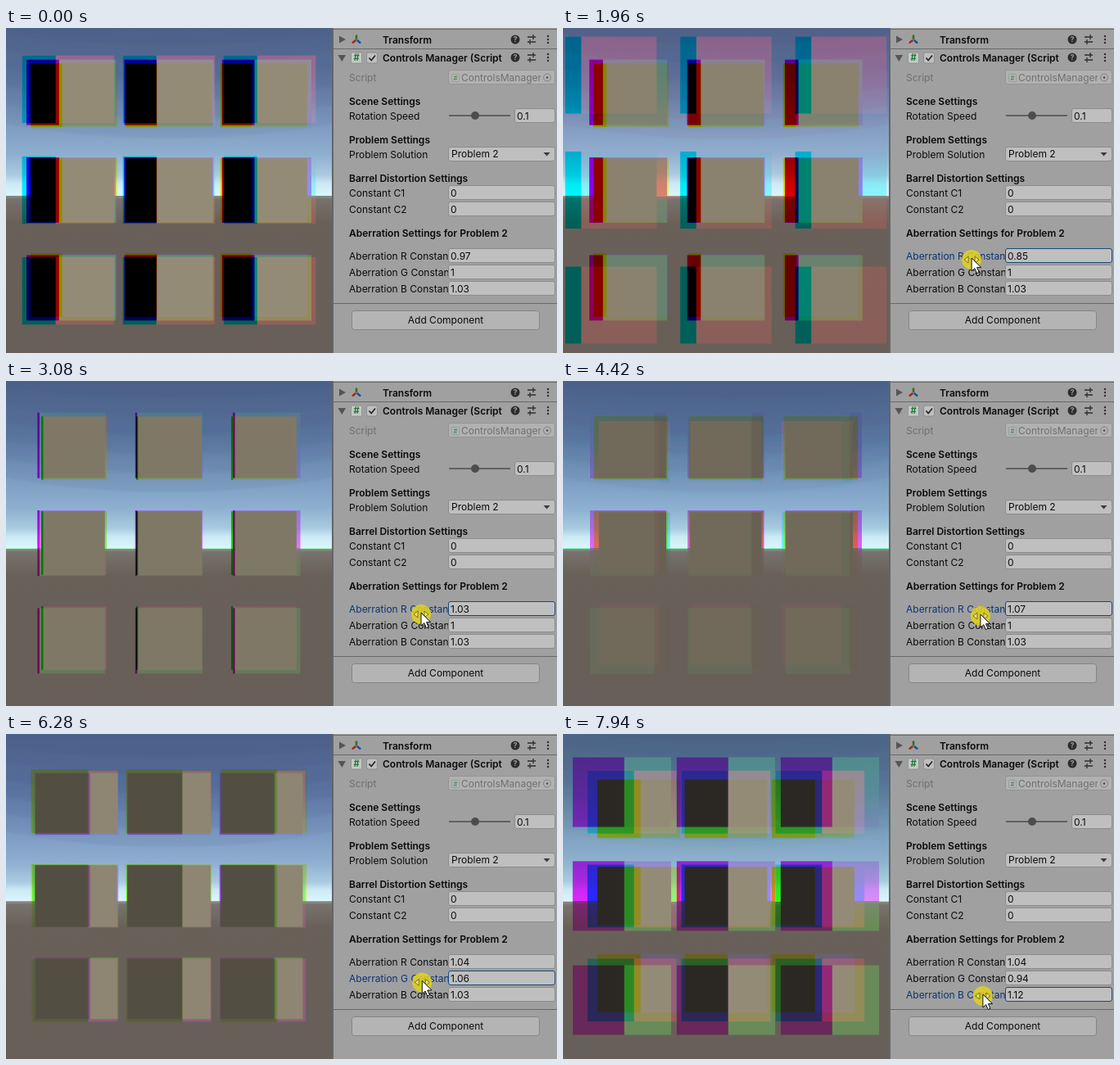
These frames come from a looping animation (673 px wide and 397 px high, 8 s). An HTML page with a canvas:

```html
<!DOCTYPE html>
<html lang="en">
<head>
<meta charset="utf-8">
<title>Chromatic aberration inspector</title>
<style>
html, body { margin: 0; width: 100%; height: 100%; overflow: hidden; background: #a0a0a0; }
canvas, #panel { position: absolute; left: 0; top: 0; }
#panel { font: 12px Inter, Roboto, sans-serif; fill: #0b0b0b; }
#panel svg { overflow: hidden; }
.bold { font-weight: 600; }
.field { fill: #bfbfbf; stroke: #8c8c8c; }
.dim { fill: #707070; }
.active .field { stroke: #1b487c; }
.active .label { fill: #0b3474; }
.line { stroke: #696969; fill: none; }
</style>
</head>
<body>
<canvas id="view" width="399" height="397"></canvas>
<svg id="panel" width="673" height="397"></svg>
<script>
const LOOP = 8000, STEP = 102.9;
const W = 399, H = 397, MID_X = 199, MID_Y = 198;
const CUBE = 80, GAP = 119.4;
const clamp = (v, lo, hi) => Math.max(lo, Math.min(hi, v));

// ---------- inspector panel ----------
const text = (x, y, s, cls = '') => `<text x="${x}" y="${Math.round(y + 4.4)}" class="${cls}">${s}</text>`;
const clipped = (x, y, w, s, cls = '') =>
  `<svg x="${x}" y="${y - 10}" width="${w}" height="20">${text(0, 10, s, cls)}</svg>`;
const box = (x, y, w, cls = 'field') =>
  `<rect x="${x + .5}" y="${y - 8.5}" width="${w - 1}" height="17" rx="2.5" class="${cls}"/>`;
const row = (y, label, value, id = '') =>
  `<g id="${id}">${clipped(419, y, 121, label, 'label')}${box(540, y - 1, 131)}
   ${text(543, y, value, 'value')}</g>`;
const headIcons = y => `
  <circle cx="622" cy="${y}" r="5.5" fill="#2d2d2d"/>
  <text x="622" y="${y + 3.4}" font-size="9" font-weight="700" text-anchor="middle" fill="#a0a0a0">?</text>
  <path d="M637 ${y - 3}h10M637 ${y + 3}h10M644 ${y - 6}v6M640 ${y}v6" stroke="#2d2d2d" stroke-width="1.3" fill="none"/>
  ${[-4, 0, 4].map(d => `<circle cx="662" cy="${y + d}" r="1.2" fill="#2d2d2d"/>`).join('')}`;
const scriptIcon = (x, y, size) => `
  <rect x="${x - size / 2}" y="${y - size / 2}" width="${size}" height="${size}" rx="1" fill="#c4c9c4" stroke="#818781" stroke-width=".7"/>
  <text x="${x}" y="${y + size * .3}" font-size="${size * .85}" font-weight="700" text-anchor="middle" fill="#1f7a35">#</text>`;

panel.innerHTML = `
  <rect x="398" width="275" height="397" fill="#a0a0a0"/>
  <rect x="398" width="2" height="397" fill="#656565"/>
  <path class="line" d="M400 1.5H673M400 25.5H673M400 336.5H673"/>
  <path d="M407 9.5l8 4.5l-8 4.5z" fill="#555"/>
  <path d="M405.5 33h9.5l-4.7 8z" fill="#555"/>
  <g fill="none" stroke-width="2.6" stroke-linecap="round">
    <path d="M428 13V9.5" stroke="#2f7326"/><path d="M426.5 15.5l-2.8 2.2" stroke="#a32a1e"/>
    <path d="M429.5 15.5l2.8 2.2" stroke="#1f4f98"/>
  </g>
  ${text(460, 14.5, 'Transform', 'bold')}${headIcons(14)}
  ${scriptIcon(428, 36.5, 13)}
  <rect x="440.5" y="30" width="13" height="13" rx="2.5" class="field"/>
  <path d="M443.5 36.5l2.7 3l4.8-6" stroke="#222" stroke-width="1.7" fill="none"/>
  ${text(460, 36.5, 'Controls Manager (Script', 'bold')}${headIcons(36)}
  ${text(419, 61, 'Script', 'dim')}
  <g opacity=".55">${box(540, 60, 131)}${scriptIcon(549, 61, 9)}
    <circle cx="661" cy="60.5" r="4.5" class="line"/><circle cx="661" cy="60.5" r="1.3"/></g>
  ${clipped(556, 61, 97, 'ControlsManager', 'dim')}
  ${text(419, 90, 'Scene Settings', 'bold')}
  ${text(419, 107.5, 'Rotation Speed')}
  <path d="M541 107H616" stroke="#4d4d4d" stroke-width="1.5"/>
  <circle cx="573" cy="107" r="5" fill="#4d4d4d"/>
  ${box(621, 107, 50)}${text(624, 107.5, '0.1')}
  ${text(419, 137, 'Problem Settings', 'bold')}
  ${text(419, 155, 'Problem Solution')}
  ${box(540, 154, 131)}${text(544, 154, 'Problem 2')}
  <path d="M656.5 152h8l-4 4.5z" fill="#3c3c3c"/>
  ${text(419, 184, 'Barrel Distortion Settings', 'bold')}
  ${row(202, 'Constant C1', '0')}${row(222, 'Constant C2', '0')}
  ${text(419, 251, 'Aberration Settings for Problem 2', 'bold')}
  ${['R', 'G', 'B'].map((c, i) => row(279 + i * 20, `Aberration ${c} Constan`, '1', 'row' + c)).join('')}
  <rect id="button" x="422.5" y="345.5" width="229" height="23" rx="3" fill="#b4b4b4" stroke="#858585"/>
  <text x="537" y="361" text-anchor="middle">Add Component</text>
  <g id="pointer">
    <g id="press">
      <circle cy="2" r="12" fill="#e2d21c" opacity=".85"/>
      <path d="M-4-2v8l-5-4zM4-2v8l5-4z" fill="#ece57a" stroke="#6d6500" stroke-width=".9"/>
    </g>
    <path d="M0 0v16l3.8-3.4l2.6 6l2.7-1.2l-2.6-5.8h5.2z" fill="#fff" stroke="#111"/>
  </g>`;

// ---------- timelines: [time, ...values] ----------
const constants = {
  R: [[0, .97], [1680, .97], [1960, .85], [2300, .81], [2540, .818], [3080, 1.03], [3500, 1.08],
      [4100, 1.09], [4420, 1.07], [4700, 1.04]],
  G: [[0, 1], [5000, 1], [5560, 1.21], [5800, 1.19], [6580, .97], [6800, .94]],
  B: [[0, 1.03], [7500, 1.03], [7940, 1.12]]
};
const pointerPath = [[200, 468, 352], [900, 497, 302], [1400, 504, 282], [1680, 504, 281], [1960, 499, 281],
  [2450, 497, 282], [3080, 507, 283], [4420, 510, 285], [4700, 508, 286], [4900, 507, 300],
  [5560, 516, 300], [6580, 505, 302], [6850, 504, 304], [7100, 505, 316], [7450, 509, 318], [7940, 513, 318]];
const presses = [[1480, 4720], [4880, 6900], [7400, LOOP]];
const focus = t => t < 1450 ? '' : t < 4840 ? 'R' : t < 7300 ? 'G' : 'B';

function at(keys, t) {
  const i = keys.findIndex(k => k[0] > t);
  if (i < 0) return keys[keys.length - 1].slice(1);
  if (i === 0) return keys[0].slice(1);
  const a = keys[i - 1], b = keys[i], p = (t - a[0]) / (b[0] - a[0]);
  return a.slice(1).map((v, j) => v + (b[j + 1] - v) * p);
}

// ---------- scene ----------
const ctx = view.getContext('2d');
const layer = Object.assign(document.createElement('canvas'), { width: W, height: H });
const pen = layer.getContext('2d');
const tints = { R: '#f00', G: '#0f0', B: '#00f' };
const HORIZON = 205;

function gradient(y0, y1, stops) {
  const g = pen.createLinearGradient(0, y0, 0, y1);
  stops.forEach(([y, color]) => g.addColorStop((y - y0) / (y1 - y0), color));
  return g;
}
const sky = gradient(-60, HORIZON, [[-60, '#5c709a'], [0, '#5f75a0'], [60, '#627dab'], [110, '#7997bf'],
  [155, '#8eafd0'], [180, '#aacbe1'], [190, '#cbe9f4'], [HORIZON, '#dcf7fc']]);
const ground = gradient(HORIZON, 460, [[HORIZON, '#8d908f'], [209, '#77726d'], [238, '#696059'], [460, '#675e59']]);

function background() {
  pen.fillStyle = sky;
  pen.fillRect(-60, -60, 520, HORIZON + 60);
  // stepped dome that sags towards the middle
  pen.fillStyle = 'rgba(40,55,92,.06)';
  for (let i = 0; i < 6; i++) {
    pen.beginPath();
    pen.ellipse(MID_X, -40, 330 + i * 25, 60 + i * 23, 0, 0, 7);
    pen.fill();
  }
  pen.fillStyle = ground;
  pen.fillRect(-60, HORIZON, 520, 262);
}

// angle: how far the face normal points to the right, in degrees
function faceColor(angle) {
  const grazing = clamp((angle - 70) / 10, 0, 1);
  const light = Math.max(0, Math.cos((angle - 40) * Math.PI / 180)) ** .62 * (1 - .2 * grazing);
  return `rgb(${[149, 140, 120].map(v => Math.round(v * light))})`;
}

function cubes(turn) {
  const a = turn * Math.PI / 180;
  const front = CUBE * Math.cos(a), side = CUBE * Math.abs(Math.sin(a));
  const leftAngle = turn > 0 ? turn - 90 : turn;
  const leftWidth = turn > 0 ? side : front;
  const width = front + side;
  for (let n = 0; n < 9; n++) {
    const x = MID_X + (n % 3 - 1) * GAP - width / 2;
    const y = MID_Y + (Math.floor(n / 3) - 1) * GAP - CUBE / 2;
    pen.fillStyle = faceColor(leftAngle + 90);
    pen.fillRect(x, y, width, CUBE);
    pen.fillStyle = faceColor(leftAngle);
    pen.fillRect(x, y, leftWidth, CUBE);
  }
}

// each colour channel shows the same scene at its own scale
function drawView(t, values) {
  ctx.globalCompositeOperation = 'source-over';
  ctx.fillStyle = '#000';
  ctx.fillRect(0, 0, W, H);
  ctx.globalCompositeOperation = 'lighter';
  for (const c in values) {
    const k = 1 / values[c];
    pen.globalCompositeOperation = 'source-over';
    pen.setTransform(k, 0, 0, k, MID_X * (1 - k), MID_Y * (1 - k));
    background();
    cubes(29.8 - t * .0091);
    pen.setTransform(1, 0, 0, 1, 0, 0);
    pen.globalCompositeOperation = 'multiply';
    pen.fillStyle = tints[c];
    pen.fillRect(0, 0, W, H);
    ctx.drawImage(layer, 0, 0);
  }
}

function drawPanel(t, values) {
  const active = focus(t);
  for (const c in values) {
    const group = document.getElementById('row' + c);
    group.setAttribute('class', c === active ? 'active' : '');
    group.querySelector('.value').textContent = values[c];
  }
  const [x, y] = at(pointerPath, t);
  pointer.setAttribute('transform', `translate(${x} ${y})`);
  pointer.setAttribute('visibility', t < 200 ? 'hidden' : 'visible');
  press.setAttribute('display', presses.some(([a, b]) => t >= a && t < b) ? 'inline' : 'none');
  button.setAttribute('fill', t >= 200 && y > 345 ? '#bdbdbd' : '#b4b4b4');
}

const pointer = document.getElementById('pointer');
const press = document.getElementById('press');
const button = document.getElementById('button');

function frame() {
  const now = performance.now() % LOOP;
  const t = Math.floor((now + 20) / STEP) * STEP;
  const values = {};
  for (const c in constants) values[c] = +at(constants[c], t)[0].toFixed(2);
  drawView(t, values);
  drawPanel(t, values);
  requestAnimationFrame(frame);
}
frame();
</script>
</body>
</html>
```
